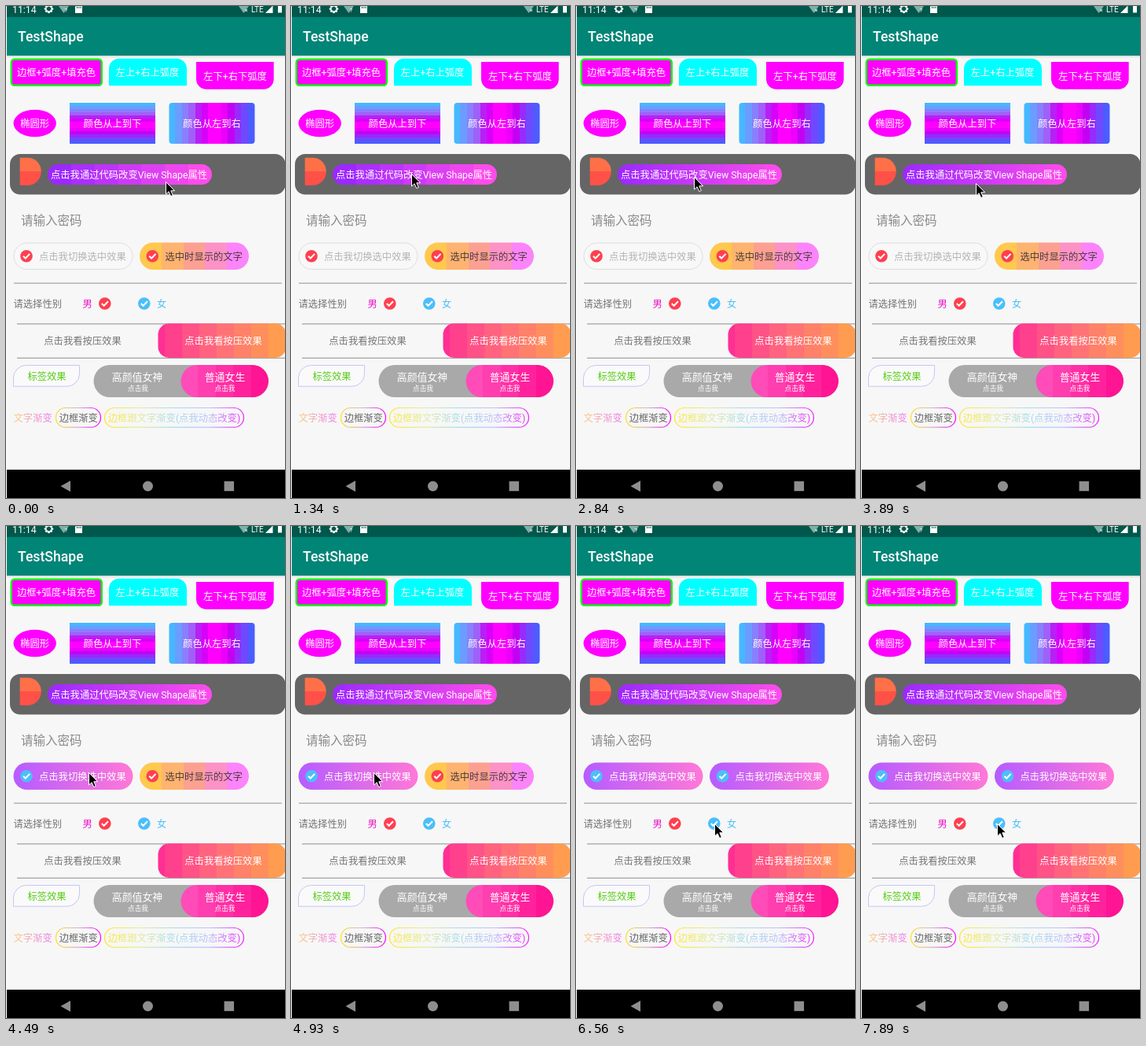
Recreate the animation shown at these times as an HTML page with a canvas. Size 355 by 625 pixels, loop 8000 ms.

```html
<!DOCTYPE html>
<html lang="zh-CN">
<head>
<meta charset="utf-8">
<title>TestShape</title>
<style>
html, body { margin: 0; width: 100%; height: 100%; overflow: hidden; background: #fff; }
canvas { display: block; width: 355px; height: 625px; }
</style>
</head>
<body>
<canvas id="stage" width="355" height="625"></canvas>
<script>
const ctx = document.getElementById('stage').getContext('2d');
const LOOP = 8000;
const STEP = 148.5; // the screen refreshes in steps of this many ms
const FONT = 'Roboto, "Noto Sans CJK SC", "Noto Sans CJK", sans-serif';
const MAGENTA = '#ff00ff', RED = '#ff3f50', BLUE = '#4abffb', GREY = '#757575', PAGE = '#f7f7f7';

// Where the pointer rests, the step it arrives at and how many steps it travels.
const STOPS = [
  { x: 203, y: 223, at: 0, travel: 1 },
  { x: 193, y: 162, at: 3, travel: 3 },
  { x: 153, y: 213, at: 9, travel: 4 },
  { x: 150, y: 217, at: 14, travel: 3 },
  { x: 146, y: 225, at: 26, travel: 1 },
  { x: 105, y: 313, at: 30, travel: 4 },
  { x: 210, y: 315, at: 37, travel: 4 },
  { x: 123, y: 376, at: 42, travel: 4 },
  { x: 176, y: 378, at: 44, travel: 2 },
  { x: 119, y: 378, at: 48, travel: 4 },
  { x: 183, y: 378, at: 51, travel: 1 },
  { x: 173, y: 378, at: 53, travel: 1 }
];
const CLICKS = { code: 13, first: 30, second: 37, male: [42, 50], female: [44, 51] };

function pointerAt(step) {
  let { x, y } = STOPS[0];
  for (const stop of STOPS) {
    const p = Math.min(1, Math.max(0, 1 - (stop.at - step) / stop.travel));
    x += (stop.x - x) * p;
    y += (stop.y - y) * p;
  }
  return [Math.round(x), Math.round(y)];
}

function mix(colors, p) {
  const pos = p * (colors.length - 1), i = Math.min(Math.floor(pos), colors.length - 2);
  const channel = (c, k) => parseInt(c.slice(1 + 2 * k, 3 + 2 * k), 16);
  const rgb = [0, 1, 2].map(k => {
    const a = channel(colors[i], k), b = channel(colors[i + 1], k);
    return Math.round(a + (b - a) * (pos - i));
  });
  return `rgb(${rgb})`;
}

// Linear gradient; a band count turns it into flat strips.
function gradient(x0, y0, x1, y1, colors, bands = 0) {
  const g = ctx.createLinearGradient(x0, y0, x1, y1);
  if (!bands) colors.forEach((c, i) => g.addColorStop(i / (colors.length - 1), c));
  for (let i = 0; i < bands; i++) {
    const c = mix(colors, i / (bands - 1));
    g.addColorStop(i / bands, c);
    g.addColorStop((i + 1) / bands, c);
  }
  return g;
}
const across = (x0, x1, colors, bands) => gradient(x0, 0, x1, 0, colors, bands);
const down = (y0, y1, colors, bands) => gradient(0, y0, 0, y1, colors, bands);

function box(x, y, w, h, radius, fill, stroke, line = 1) {
  ctx.beginPath();
  ctx.roundRect(x, y, w, h, radius);
  if (fill) { ctx.fillStyle = fill; ctx.fill(); }
  if (stroke) { ctx.strokeStyle = stroke; ctx.lineWidth = line; ctx.stroke(); }
}

function rect(x, y, w, h, fill) {
  ctx.fillStyle = fill;
  ctx.fillRect(x, y, w, h);
}

function disc(x, y, rx, ry, fill) {
  ctx.beginPath();
  ctx.ellipse(x, y, rx, ry, 0, 0, 7);
  ctx.fillStyle = fill;
  ctx.fill();
}

function shape(path, fill) {
  ctx.fillStyle = fill;
  ctx.fill(new Path2D(path));
}

function label(text, x, middle, fill, size = 12.3, align = 'left', weight = 400) {
  ctx.font = `${weight} ${size}px ${FONT}`;
  ctx.textAlign = align;
  ctx.fillStyle = fill;
  ctx.fillText(text, x, middle + size * 0.37);
}
const centred = (text, x, y, fill, size) => label(text, x, y, fill, size, 'center');

function check(x, y, color) {
  disc(x, y, 7.8, 7.8, color);
  ctx.strokeStyle = '#fff';
  ctx.lineWidth = 2;
  ctx.stroke(new Path2D(`M${x - 4} ${y}l2.8 2.8l5.4 -5.6`));
}

function wifi(x, mark) {
  shape(`M${x - 6.5} 0h13l-6.5 9z`, '#7fb0a8');
  label(mark, x + 1, 5, '#fff', 8);
}

function statusBar() {
  rect(1, 0, 354, 14, '#00574b');
  label('11:14', 8, 4, '#fff');
  for (let i = 0; i < 8; i++) {
    const a = i * Math.PI / 4;
    disc(54.5 + 4.2 * Math.cos(a), 3.5 + 4.2 * Math.sin(a), 1.6, 1.6, '#fff');
  }
  disc(54.5, 3.5, 1.8, 1.8, '#00574b');
  wifi(73.5, '?');
  shape('M89 0h8v9h-9v-8z', '#fff');
  for (let x = 90; x < 96; x += 2.3) rect(x, 0.5, 1, 2.5, '#00574b');
  wifi(302.5, '×');
  label('LTE', 312, 4, '#fff', 10);
  shape('M330 9h9.5v-9.5z', '#fff');
  rect(346, 0, 5, 8.5, '#fff');
}

function header() {
  rect(1, 14, 354, 49, '#008577');
  rect(1, 63, 354, 3, down(63, 66, ['#d2d5d4', PAGE]));
  label('TestShape', 15, 38.5, '#fff', 17.6, 'left', 500);
}

function shapeRows() {
  box(6.8, 67.8, 115, 33, 4, MAGENTA, '#00ff00', 2.4);
  centred('边框+弧度+填充色', 64, 84.5, '#fff');
  box(131, 66.7, 99, 34.6, [13, 13, 0, 0], '#00ffff');
  centred('左上+右上弧度', 180, 84.5, '#fff');
  box(242, 71, 98.7, 34.7, [0, 0, 13, 13], MAGENTA);
  centred('左下+右下弧度', 291.5, 89, '#fff');

  disc(36.7, 149, 27.2, 17.3, MAGENTA);
  centred('椭圆形', 36.7, 149.5, '#fff');
  const sweep = ['#45b8ff', '#7c90ff', '#a060f8', '#c400f4', MAGENTA, MAGENTA, '#c400f4', '#8040ff', '#4c5cff'];
  rect(81, 123, 109, 52, down(123, 175, sweep, 13));
  centred('颜色从上到下', 135.5, 149.5, '#fff');
  box(207.5, 123, 109, 52, 4, across(207, 316, sweep, 13));
  centred('颜色从左到右', 262, 149.5, '#fff');
}

function codeRow(clicked) {
  box(5, 188, 350.5, 51.6, 13, '#656565');
  box(17.7, 192.7, 27, 35, [0, 17, 17, 0], down(193, 228, ['#ff7048', '#ff5147'], 2));
  box(53, 201, 209, 26, 13, across(53, 262, ['#9c28ff', '#fe4cec'], clicked ? 0 : 7));
  label('点击我通过代码改变View Shape属性', 57, 214.5, '#fff');
}

function togglePill(x, on) {
  if (on) box(x, 300.5, 152, 34.5, 17.2, across(x, x + 152, ['#b65cff', '#ff78d8']));
  else box(x + 0.5, 301, 151, 33.5, 16.7, '#f8f8f8', '#dedede');
  check(x + 16.5, 317.7, on ? BLUE : RED);
  label('点击我切换选中效果', x + 32.5, 318, on ? '#fff' : '#b4b4b4');
}

function pills(firstOn, secondOn) {
  label('请输入密码', 19, 272, '#8a8a8a', 15.5);
  togglePill(9.5, firstOn);
  if (secondOn) return togglePill(170, true);
  box(170, 300.5, 139, 34.5, 17.2, across(170, 309, ['#ffc84e', '#fca092', '#fc84fa'], 5));
  check(186.3, 317.7, RED);
  label('选中时显示的文字', 202.5, 318, '#4c3a3a');
}

function radios(male) {
  const text = on => on ? BLUE : '#ea14c8';
  const mark = on => on ? BLUE : RED;
  rect(10, 351.5, 341, 1.3, '#a8a8a8');
  label('请选择性别', 9.5, 378.5, GREY);
  label('男', 97.5, 378.5, text(male));
  check(125.8, 378, mark(male));
  check(175.8, 378, mark(!male));
  label('女', 192, 378.5, text(!male));
}

function pressRow() {
  for (const y of [403.4, 446.7]) rect(14, y, 341, 1, '#8c8c8c');
  centred('点击我看按压效果', 97.5, 425.5, GREY);
  const fill = across(180, 356, ['#ff2f94', '#ff6c7c', '#ff9c50'], 8);
  box(193.5, 403.3, 163, 43.6, 14, fill);
  centred('点击我看按压效果', 276.5, 425.5, '#fff');
}

function tagRow() {
  box(9.5, 456.5, 84, 26.7, [16, 0, 16, 0], '#fafafa', '#c4c6f6');
  centred('标签效果', 52, 470, '#58cc18');

  box(111.5, 456, 222.5, 41, 20.5, '#a9a9a9');
  box(222.5, 456, 111.5, 41, 20.5, across(222, 334, ['#ff4cb8', '#ff1493'], 5));
  centred('高颜值女神', 167, 471, '#fff', 12.9);
  centred('普通女生', 278.5, 471, '#fff', 12.9);
  for (const x of [168, 278.5]) centred('点击我', x, 485.5, '#fff', 8.7);
}

function gradientRow() {
  label('文字渐变', 9.5, 523, across(9, 59, ['#ffd078', '#f0a0c0', '#f078f0']));
  box(63.5, 510.5, 57, 24.7, 12.3, null, across(63, 121, ['#ffe020', '#d0b0d0', MAGENTA]), 1.2);
  centred('边框渐变', 92.3, 523, '#666');
  const fill = across(125, 303, ['#ffe628', '#e4ec9c', '#a4dcf0', '#bcc0ff', '#f020ff']);
  box(125.5, 510.5, 177, 24.7, 12.3, null, fill, 1.2);
  centred('边框跟文字渐变(点我动态改变)', 214, 523, fill);
}

function navBar() {
  const grey = '#8e8e8e';
  rect(1, 589, 354, 36, '#000');
  shape('M69.5 610l12.5 -7v14z', grey);
  disc(180.5, 610, 6.5, 6.5, grey);
  rect(277.6, 603.7, 12.5, 12.5, grey);
}

function pointer(step) {
  const [x, y] = pointerAt(step);
  ctx.save();
  ctx.translate(x + 0.5, y + 0.5);
  const arrow = new Path2D('M0 0v15.5l3.6 -3.3l2.6 5.8l2.6 -1l-2.5 -5.8h4.9z');
  ctx.fillStyle = '#000';
  ctx.fill(arrow);
  ctx.strokeStyle = '#fff';
  ctx.lineWidth = 1;
  ctx.stroke(arrow);
  ctx.restore();
}

function draw(now) {
  const step = Math.floor(now % LOOP / STEP);
  const male = CLICKS.male.some((from, i) => step >= from && step < CLICKS.female[i]);
  rect(0, 0, 355, 625, '#fff');
  rect(1, 0, 354, 625, PAGE);
  statusBar();
  header();
  shapeRows();
  codeRow(step >= CLICKS.code);
  pills(step >= CLICKS.first, step >= CLICKS.second);
  radios(male);
  pressRow();
  tagRow();
  gradientRow();
  navBar();
  pointer(step);
}

const start = performance.now();
function tick() {
  draw(performance.now() - start);
  requestAnimationFrame(tick);
}
tick();
</script>
</body>
</html>
```
